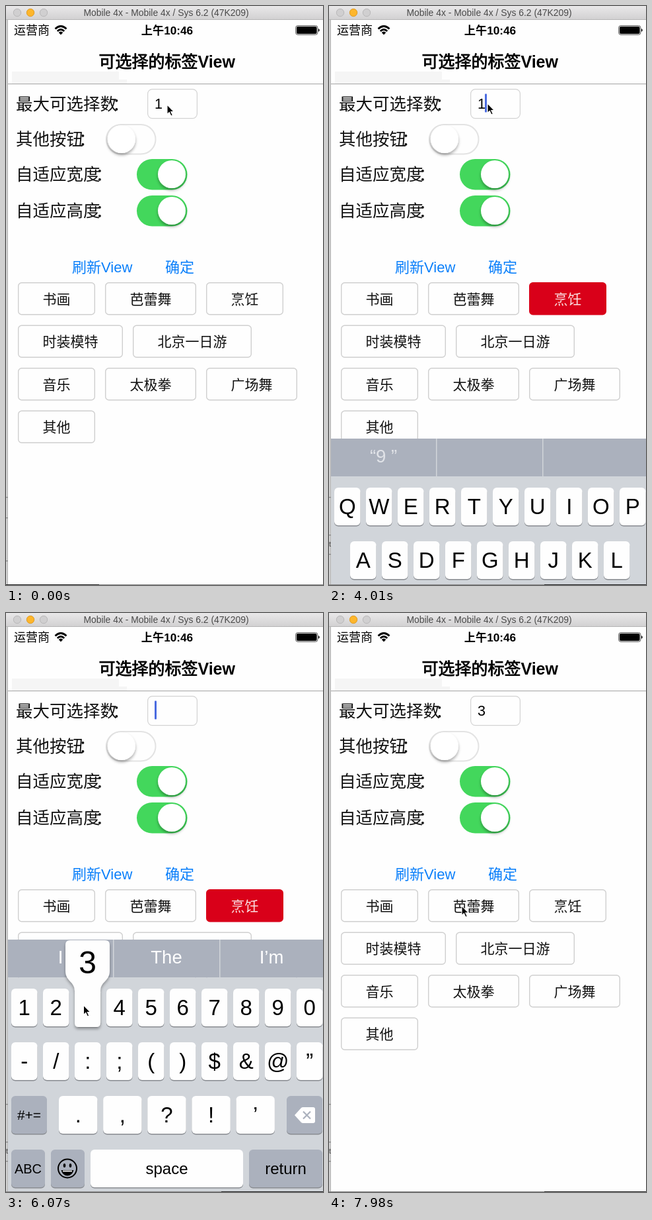
Recreate the animation shown at these times as an HTML page. Size 480 by 874 pixels, loop 8000 ms.

```html
<!DOCTYPE html>
<html lang="zh-CN">
<head>
<meta charset="utf-8">
<title>可选择的标签View</title>
<style>
  html, body { margin: 0; width: 100%; height: 100%; overflow: hidden; background: #fefefe; }
  svg { display: block; width: 100%; height: 100%; }
  text { font-family: 'Liberation Sans', 'Noto Sans CJK SC', 'Noto Sans CJK', sans-serif; font-weight: 300; white-space: pre; }
  .mid { text-anchor: middle; }
  .bold { font-weight: 700; }
  .medium { font-weight: 400; stroke: #000; stroke-width: .8; }
  .tag rect { fill: #fefefe; stroke: #cfcfcf; stroke-width: 1.4; }
  .tag text { font-size: 21px; fill: #111; }
  .tag.on rect { fill: #d90019; stroke: #d90019; }
  .tag.on text { fill: #fbe3e5; }
  .hide { display: none; }
</style>
</head>
<body>
<svg id="stage" viewBox="0 0 480 874" preserveAspectRatio="none"></svg>
<script>
const LOOP = 8000, STEP = 147.8;
const stage = document.getElementById('stage');

const rect = (x, y, w, h, fill, r = 0, extra = '') =>
  `<rect x="${x}" y="${y}" width="${w}" height="${h}" rx="${r}" fill="${fill}" ${extra}/>`;
const circle = (x, y, r, fill, extra = '') =>
  `<circle cx="${x}" cy="${y}" r="${r}" fill="${fill}" ${extra}/>`;
const text = (s, x, y, size, extra = '') =>
  `<text x="${x}" y="${y}" font-size="${size}" ${extra}>${s.replace('&', '&amp;')}</text>`;
const centred = (s, x, y, size, extra = '') => text(s, x, y, size, 'text-anchor="middle" ' + extra);

// Settings form
const label = (s, cy) => text(s + '<tspan dx="-7">：</tspan>', 15, cy + 9.3, 25.5, 'fill="#111"');
function toggle(x, cy, on) {
  const body = on
    ? rect(x, cy - 23, 76.5, 46.5, '#43d75c', 23.2)
    : rect(x + 1, cy - 22, 74.5, 44.5, '#fefefe', 22.2, 'stroke="#e3e3e3" stroke-width="2"');
  return body + circle(on ? x + 53 : x + 24, cy, 21, '#fff', 'filter="url(#drop)"');
}

// Selectable tags: width follows the text length
const tagRows = [['书画', '芭蕾舞', '烹饪'], ['时装模特', '北京一日游'], ['音乐', '太极拳', '广场舞'], ['其他']];
function tags() {
  return tagRows.map((row, i) => {
    let x = 18;
    const y = 417 + i * 64.5;
    return row.map(name => {
      const w = name.length * 21 + 75;
      const tag = `<g class="tag" data-tag="${name}">` +
        rect(x + .7, y + .7, w - 1.4, 48, '#fefefe', 5) + centred(name, x + w / 2, y + 32.6, 21) + '</g>';
      x += w + 15;
      return tag;
    }).join('');
  }).join('');
}

// Keyboard
const GREY = '#abb1bd';
const key = (x, y, w, s = '', size = 33, fill = '#fefefe') =>
  rect(x, y + 1.6, w, 57, '#898c91', 6) + rect(x, y, w, 57, fill, 6) +
  centred(s, x + w / 2, y + 28.5 + size * .36, size);
const keyRow = (chars, x, y, w = 39.5, pitch = 48) =>
  [...chars].map((c, i) => key(x + i * pitch, y, w, c)).join('');
const eraseKey = (fill, icon, cross) => key(425, 729, 54, '', 0, fill) +
  `<path d="M437 758L447 747Q448 746 450 746H465Q468 746 468 749V767Q468 770 465 770H450Q448 770 447 769Z" fill="${icon}"/>
   <path d="M450 752.5L461 763.5M461 752.5L450 763.5" stroke="${cross}" stroke-width="2.2"/>`;
const smiley = `<circle cx="93" cy="838.5" r="14" fill="none" stroke="#000" stroke-width="2"/>
  <ellipse cx="88.5" cy="834" rx="1.8" ry="3"/><ellipse cx="97.5" cy="834" rx="1.8" ry="3"/>
  <path d="M83.5 841H102.5Q100 849.5 93 849.5Q86 849.5 83.5 841Z"/>
  <path d="M86 842.5H100" stroke="#fff" stroke-width="1.8"/>`;

function keyboard() {
  return rect(3, 493, 477, 57.5, GREY) + rect(3, 550.5, 477, 324, '#d1d5da') +
    rect(162, 493, 1.5, 57.5, '#d1d5da') + rect(323, 493, 1.5, 57.5, '#d1d5da') +
    [82.5, 243, 402].map((x, i) => centred('', x, 529, 27.5, `id="hint${i}" fill="#fff"`)).join('') +
    '<g id="letters">' + keyRow('QWERTYUIOP', 8, 567) + keyRow('ASDFGHJKL', 32, 648) +
      keyRow('ZXCVBNM', 80, 729) + key(8, 729, 54, '', 0, GREY) +
      '<path d="M34.5 744L49 759H42V768Q42 770 40 770H29Q27 770 27 768V759H20Z" fill="#fff"/>' +
      key(8, 810, 51, '123', 22.5, GREY) + '</g>' +
    '<g id="digits">' + keyRow('1234567890', 8, 567) + keyRow('-/:;()$&@”', 8, 648) +
      keyRow('.,?!’', 80, 729, 58.5, 67.1) + key(8, 729, 54, '#+=', 21, GREY) +
      key(8, 810, 51, 'ABC', 20, GREY) + '</g>' +
    '<g id="erase">' + eraseKey(GREY, '#fff', GREY) + '</g>' +
    '<g id="erasePressed">' + eraseKey('#fefefe', '#000', '#fff') + '</g>' +
    key(68, 810, 51, '', 0, GREY) + smiley +
    key(128, 810, 231, 'space', 24) + key(368, 810, 111, 'return', 24, GREY) +
    `<g id="bubble" filter="url(#drop)"><path fill="#fefefe" d="M97 494H150Q157 494 157 501V540C157 556 143 556 143 570V619Q143 625 137 625H110Q104 625 104 619V570C104 556 90 556 90 540V501Q90 494 97 494Z"/>` +
      centred('3', 123.5, 544, 48) + '</g>';
}

const wifi = `<g fill="none" stroke="#000" stroke-width="2.8">
  <path d="M74.5 34.5Q83 26.5 91.5 34.5M77.8 38Q83 33 88.2 38"/></g>
  <path d="M79.7 40Q83 37 86.3 40L83 43.5Z"/>`;
const battery = rect(438.5, 29.5, 33.5, 14, '#ddd', 3.5, 'stroke="#666"') +
  rect(440, 31, 30.5, 11, '#000', 2) + '<path d="M473 34Q476.5 36.5 473 39Z"/>';

// Slivers of the desktop behind the window: left-hand lines and a dark stretch of the bottom edge
const desktop = (lines, x, w) =>
  lines.map(y => rect(0, y, 3, 1.3, '#888')).join('') + rect(x, 873, w, 1, '#222');

stage.innerHTML = `<defs>
    <linearGradient id="bar" x2="0" y2="1"><stop stop-color="#e9e8e9"/><stop offset="1" stop-color="#d2d1d2"/></linearGradient>
    <linearGradient id="edge"><stop stop-color="#dedede"/><stop offset="1" stop-color="#b4b4b4"/></linearGradient>
    <filter id="drop" x="-30%" y="-30%" width="160%" height="170%"><feDropShadow dx="0" dy="3" stdDeviation="2.2" flood-opacity=".34"/></filter>
  </defs>` +
  rect(0, 0, 480, 874, '#fefefe') +
  rect(0, 0, 480, 20, 'url(#bar)') + rect(0, 20, 480, 1, '#b5b5b5') +
  circle(17, 10, 5.7, '#d0cfd0', 'stroke="#b9b8b9"') + circle(37, 10, 5.7, '#fdb62c', 'stroke="#e09c25"') +
  circle(57, 10, 5.7, '#d0cfd0', 'stroke="#b9b8b9"') +
  centred('Mobile 4x - Mobile 4x / Sys 6.2 (47K209)', 242.5, 15, 13.9, 'fill="#4a4a4a"') +
  text('运营商', 12, 43, 18) + wifi + centred('上午10:46', 244, 43, 17.2, 'class="bold"') + battery +
  rect(9, 99, 162, 12.5, '#f5f5f5') + rect(9, 111, 174, 6, '#f5f5f5') + rect(3, 117, 477, 1.2, '#b0b0b0') +
  centred('<tspan class="medium">可选择的标签</tspan><tspan class="bold">View</tspan>', 243.7, 93, 25) +
  label('最大可选择数', 147.5) + label('其他按钮', 201) + label('自适应宽度', 254) + label('自适应高度', 308.5) +
  rect(214.6, 125.6, 74.8, 44, '#fefefe', 7, 'stroke="#d3d3d3" stroke-width="1.2"') +
  text('', 225, 155, 21.5, 'id="amount"') + rect(0, 132.5, 3, 28, '#4a6be0', 1, 'id="caret"') +
  toggle(151, 201, false) + toggle(198, 254, true) + toggle(198, 309, true) +
  text('刷新View', 100, 401.5, 22, 'id="refresh" fill="#0a7ffa"') + text('确定', 241, 401.5, 22, 'fill="#0a7ffa"') +
  tags() + '<g id="keyboard">' + keyboard() + '</g>' +
  rect(0, 21, 3, 853, 'url(#edge)') + rect(0, 873, 480, 1, '#888') +
  '<g id="backA">' + desktop([741, 772, 837], 0, 141) + '</g>' +
  '<g id="backB">' + desktop([741, 798, 827], 326, 154) + text('t', 0, 816, 11, 'fill="#444"') + '</g>' +
  '<path id="pointer" d="M0 0V14.5L3.3 11.4L5.9 17L8.3 16L5.8 10.5H10.3Z" stroke="#fff" stroke-width="1.1"/>';

// Value of a track [[tick, ...values], ...] at a tick, eased between its points
function track(points, n) {
  let i = 0;
  while (i < points.length - 2 && n >= points[i + 1][0]) i++;
  const [a, b] = [points[i], points[i + 1]];
  const p = Math.min(1, Math.max(0, (n - a[0]) / (b[0] - a[0])));
  const e = p * p * (3 - 2 * p);
  return a.slice(1).map((v, k) => v + (b[k + 1] - v) * e);
}

const pointerPath = [
  [0, 244, 149], [5, 80, 440], [8, 72, 438], [12, 256, 503], [14, 256, 503], [17, 331, 449], [20, 331, 449],
  [23, 262, 198], [25, 240, 147], [28, 240, 147], [32, 441, 751], [34, 441, 751], [36, 30, 829], [37, 30, 829],
  [39, 116, 592], [42, 118, 592], [46, 137, 392], [50, 137, 392], [54, 201, 442]];
const keyboardDrop = [[26, 381], [27, 160], [28, 35], [29, 0], [49, 0], [50, 70], [51, 230], [52, 350], [53, 381]];
const selected = { '书画': [8, 14], '北京一日游': [13, 19], '烹饪': [18, 50] };

const $ = id => document.getElementById(id);
const show = (id, visible) => $(id).classList.toggle('hide', !visible);
const within = (n, from, to) => n >= from && n < to;

function hintsAt(n) {
  if (n < 28) return ['“9 ”', '', ''];
  if (n < 34) return ['“1”', '', ''];
  if (n < 42) return ['I', 'The', 'I’m'];
  return ['“3”', '', ''];
}

function draw(n) {
  const [x, y] = track(pointerPath, n);
  $('pointer').setAttribute('transform', `translate(${x} ${y})`);
  $('keyboard').setAttribute('transform', `translate(0 ${track(keyboardDrop, n)[0]})`);
  for (const [name, [from, to]] of Object.entries(selected))
    stage.querySelector(`[data-tag="${name}"]`).classList.toggle('on', within(n, from, to));

  const amount = n < 33 ? '1' : n < 42 ? '' : '3';
  $('amount').textContent = amount;
  $('caret').setAttribute('x', amount ? 236 : 225);
  show('caret', within(n, 26, 48) && (n - 26) % 7 < 4);
  hintsAt(n).forEach((s, i) => {
    $('hint' + i).textContent = s;
    $('hint' + i).setAttribute('opacity', within(n, 28, 42) ? 1 : .65);
  });

  show('letters', n < 37);
  show('digits', n >= 37);
  show('erase', !within(n, 32, 34));
  show('erasePressed', within(n, 32, 34));
  show('bubble', n === 41);
  show('backA', n < 4);
  show('backB', n >= 4);
  $('refresh').setAttribute('opacity', within(n, 48, 51) ? .2 : 1);
}

let last = -1;
const start = performance.now();
function tick(now) {
  const t = Math.max(0, now - start) % LOOP;
  const n = Math.floor((t + 10) / STEP);
  if (n !== last) draw(last = n);
  requestAnimationFrame(tick);
}
tick(start);
</script>
</body>
</html>
```
